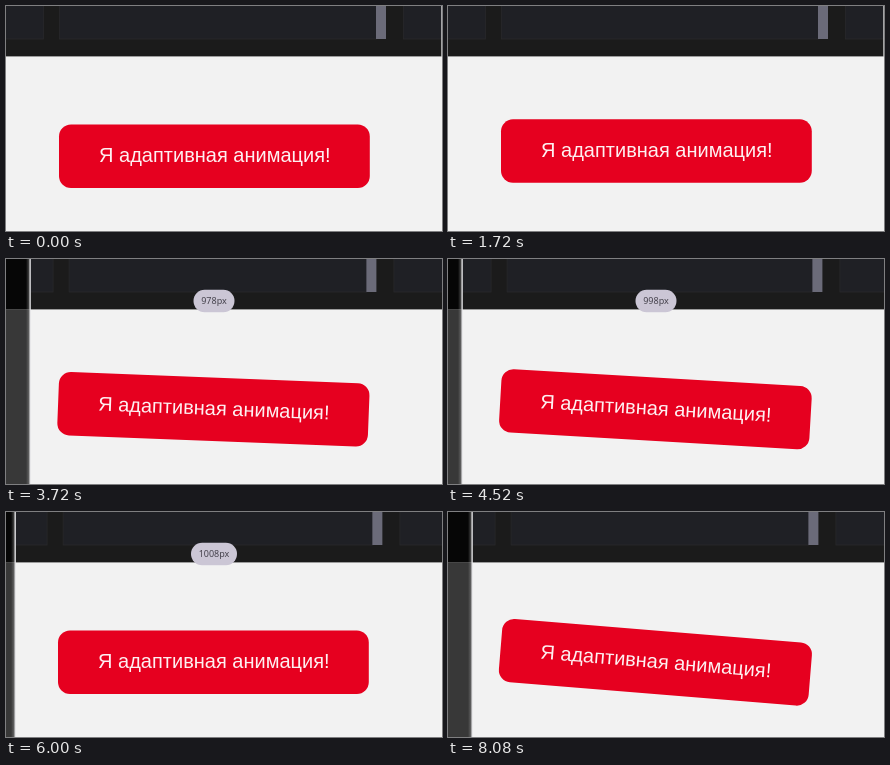
Recreate the animation shown at these times as an HTML page. Size 436 by 225 pixels, loop 8.12 s.

```html
<!DOCTYPE html>
<html lang="ru">
<head>
<meta charset="utf-8">
<style>
  html, body { margin: 0; width: 100%; height: 100%; overflow: hidden; background: #f2f2f2; }
  svg { display: block; width: 436px; height: 225px; }
  text { text-anchor: middle; }
  .cta { font: 20px "Liberation Sans", Arial, sans-serif; fill: #fff; fill-opacity: .94; }
  .size { font: 9px "Noto Sans", sans-serif; fill: #45424c; }
</style>
</head>
<body>
<svg viewBox="0 0 436 225">
  <defs>
    <linearGradient id="glow">
      <stop offset="0" stop-color="#aaa" stop-opacity="0"/>
      <stop offset="1" stop-color="#aaa" stop-opacity=".5"/>
    </linearGradient>
  </defs>
  <rect width="436" height="225" fill="#f2f2f2"/>
  <rect width="436" height="50.4" fill="#1b1b1b"/>
  <g fill="#1f2025" stroke="#29292b" stroke-width=".8">
    <rect class="toRight" x="-60" y="-2" width="97.5" height="35"/>
    <rect id="panel" y="-2" height="35"/>
    <rect class="toLeft" x="397.5" y="-2" width="90" height="35"/>
  </g>
  <rect class="toLeft" x="370" width="10" height="33" fill="#6b6b79"/>
  <rect class="toRight" x="435.3" width="1" height="51" fill="#ddd"/>

  <g id="button">
    <rect x="53" y="118.6" width="310.8" height="63.4" rx="12" fill="#e6001f"/>
    <text class="cta" x="208.8" y="156">Я адаптивная анимация!</text>
  </g>

  <g id="gutter">
    <rect x="-40" width="40" height="50.4" fill="#060606"/>
    <rect x="-40" y="50.4" width="40" height="175" fill="#383838"/>
    <rect x="-4" width="4" height="225" fill="url(#glow)"/>
    <rect x="-.5" width="1.3" height="225" fill="#e4e4e6"/>
  </g>

  <g id="label">
    <rect id="pill" y="30.7" height="22.5" rx="11.2" fill="#cbc6d5"/>
    <text id="size" class="size" x="208" y="45"></text>
  </g>
</svg>
<script>
const LOOP = 8120, LIMIT = 13;
const $ = id => document.getElementById(id);

// Left edge of the viewport being dragged: [ms, px]
const drag = [[0, 0], [1800, 0], [2520, 9], [2730, 13], [2920, 18], [3300, 24], [4200, 24],
  [4460, 14], [5000, 14], [5050, 13], [5450, 2], [5900, 9], [6000, 9], [6060, 13], [6600, 24], [LOOP, 24]];
// Moments when the breakpoint is crossed and the animation restarts
const starts = [0, 2730, 5050, 6060];

function track(keys, t) {
  const i = Math.max(1, keys.findIndex(k => k[0] >= t));
  const [t0, a] = keys[i - 1], [t1, b] = keys[i];
  return a + (b - a) * (t - t0) / (t1 - t0);
}

// cubic-bezier(.25, .1, .25, 1)
function ease(x) {
  const bezier = (a, b, s) => 3 * a * s * (1 - s) ** 2 + 3 * b * s * s * (1 - s) + s ** 3;
  let lo = 0, hi = 1;
  for (let i = 0; i < 24; i++) {
    const mid = (lo + hi) / 2;
    if (bezier(.25, .25, mid) < x) lo = mid; else hi = mid;
  }
  return bezier(.1, 1, lo);
}

function thereAndBack(ms, period) {
  const p = ms / period % 1 * 2;
  return p < 1 ? ease(p) : 1 - ease(p - 1);
}

const move = (el, x, y = 0) => el.setAttribute("transform", `translate(${x} ${y})`);

function draw(t) {
  const edge = track(drag, t);
  const squeeze = edge * .4;
  document.querySelectorAll(".toRight").forEach(el => move(el, squeeze));
  document.querySelectorAll(".toLeft").forEach(el => move(el, -squeeze));
  $("panel").setAttribute("x", 53.5 + squeeze);
  $("panel").setAttribute("width", 317 - 2 * squeeze);
  move($("gutter"), edge < .1 ? -5 : edge);

  const phase = starts.filter(s => s <= t).length - 1;
  const age = t - starts[phase];
  const shift = -Math.min(1, edge / LIMIT * 1.5);
  if (phase % 2) {
    const angle = 5 * thereAndBack(age, 1500);
    $("button").setAttribute("transform", `translate(${shift} 0) rotate(${angle} 208.5 150.3)`);
  } else {
    move($("button"), shift, -20 * thereAndBack(age, 1000));
  }

  const width = 1026 - 2 * Math.round(edge);
  const pill = width > 999 ? 46 : 41;
  $("size").textContent = width + "px";
  $("pill").setAttribute("x", 208 - pill / 2);
  $("pill").setAttribute("width", pill);
  const fade = Math.min((t - 1850) / 200, (7500 - t) / 200);
  $("label").setAttribute("opacity", Math.max(0, Math.min(1, fade)));
}

const begin = performance.now();
function tick() {
  draw((performance.now() - begin) % LOOP);
  requestAnimationFrame(tick);
}
tick();
</script>
</body>
</html>
```
